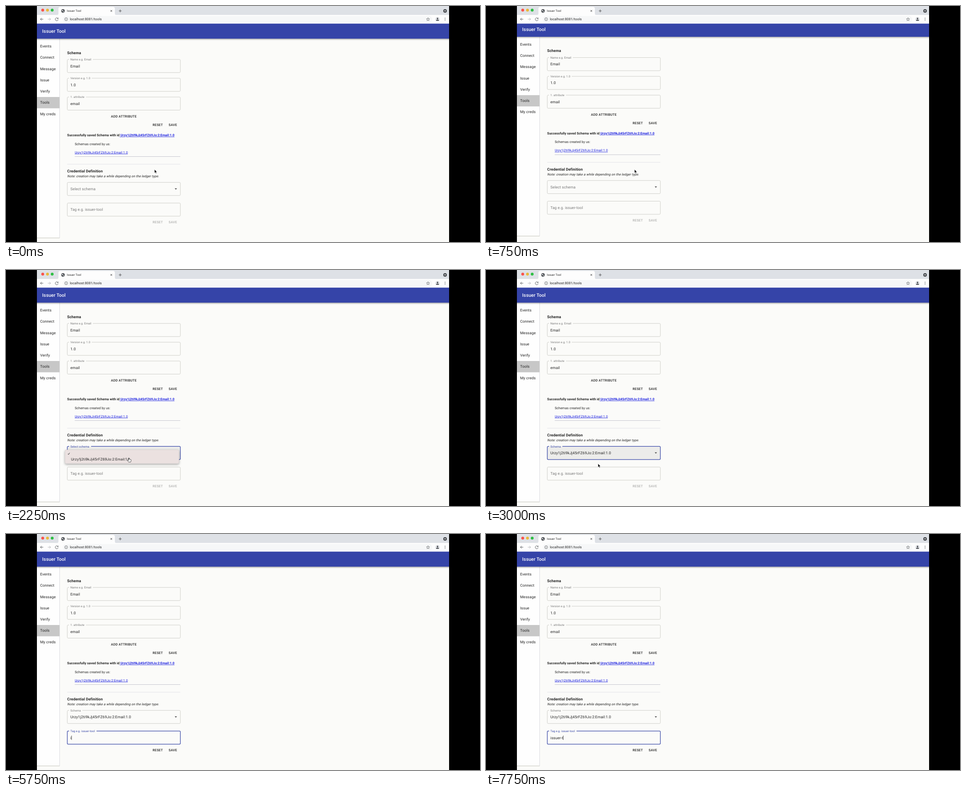
Recreate the animation shown at these times as an HTML page. Size 1058 px wide and 529 px high, loop 8 s.

```html
<!DOCTYPE html>
<html lang="en">
<head>
<meta charset="utf-8">
<title>Issuer Tool</title>
<style>
html, body { margin: 0; width: 100%; height: 100%; overflow: hidden; background: #000; }
svg { display: block; width: 100vw; height: 100vh; }
text { font-family: Roboto, Arial, sans-serif; text-rendering: geometricPrecision; white-space: pre; }
.system { font-family: Inter, Arial, sans-serif; }
.link { fill: #1a1fe0; text-decoration: underline; }
.tight { letter-spacing: .03px; }
</style>
</head>
<body>
<svg id="stage" viewBox="0 0 1058 529" preserveAspectRatio="none"></svg>
<script>
const LOOP = 8000, STEP = 250;
const SCHEMA_ID = 'Urzy1j2ti9kJj45rFZ69Jo:2:Email:1.0';
const TAG = 'issuer-tool';
const INK = '#242424', GREY = '#777', LINE = '#c3c3bd', INDIGO = '#3646a6';
const BODY = 8.42, SMALL = 7.36, LABEL = 6.31;
const LEFT = 69, WIDTH = 920, BAR_TOP = 39.4;
const stage = document.getElementById('stage');

// Text is placed by the vertical centre of its capitals.
const baseline = (y, size) => (y + size * 0.355).toFixed(2);
const text = (x, y, str, size = BODY, attrs = '') =>
  `<text x="${x}" y="${baseline(y, size)}" font-size="${size}" fill="${INK}" letter-spacing="${(size * 0.0098).toFixed(3)}" ${attrs}>${str}</text>`;
const rect = (x, y, w, h, fill, attrs = '') =>
  `<rect x="${x}" y="${y}" width="${w}" height="${h}" fill="${fill}" ${attrs}/>`;
const circle = (x, y, r, fill, attrs = '') =>
  `<circle cx="${x}" cy="${y}" r="${r}" fill="${fill}" ${attrs}/>`;
const path = (d, stroke, width = 0.8, attrs = '') =>
  `<path d="${d}" fill="none" stroke="${stroke}" stroke-width="${width}" ${attrs}/>`;

// Field border, open at the top between x = 140.9 and the notch end.
const outline = (y, notch) =>
  `M${notch} ${y}H387.2a2 2 0 0 1 2 2v25.4a2 2 0 0 1 -2 2H138.8a2 2 0 0 1 -2 -2v-25.4a2 2 0 0 1 2 -2H140.9`;
const filledField = (y, label, value, notch) =>
  path(outline(y, notch), LINE) +
  text(143.8, y - 0.2, label, LABEL, `style="fill:${GREY}"`) +
  text(143.8, y + 14.8, value);
const button = (x, y, str) =>
  `<text x="${x}" y="${baseline(y, SMALL)}" font-size="${SMALL}" font-weight="500" letter-spacing=".21" text-anchor="middle" fill="${INK}">${str}</text>`;
// Upright letters slanted in place keep their upright widths.
const slanted = (x, y, str, size) =>
  `<g transform="translate(${x} ${baseline(y, size)}) skewX(-14)">${text(0, -size * 0.355, str, size)}</g>`;

function browserBar() {
  const icon = '#55585c';
  return rect(LEFT, 0, WIDTH, 20.5, '#dee1e6') +
    rect(LEFT, 20, WIDTH, BAR_TOP - 20, '#fdfdfd') +
    rect(126.5, 22.6, 825, 14.2, '#f6f7f8', 'rx="7.1"') +
    circle(82, 9.3, 3.2, '#f9544d') + circle(92.6, 9.3, 3.2, '#e9b93a') + circle(103.1, 9.3, 3.2, '#2fbf45') +
    '<path d="M113 20.5q4 0 4-4V6q0-4 4-4H239q4 0 4 4v10.500q0 4 4 4z" fill="#fdfdfd"/>' +
    circle(127.2, 11, 3.9, '#4a4d51') +
    '<path d="M124.300 9.500l2.700-.8 1 1.200-1.400 1.800-1.700-.4zM127.800 11.800l2-.2-.6 2-1.400.3z" fill="#dadcde"/>' +
    text(136, 11.1, 'Issuer Tool', 6.4) +
    path('M233.100 9.100l3.800 3.800m0-3.800l-3.800 3.800', '#444', 0.9) +
    path('M251.700 11h6.400M254.900 7.800v6.400', '#444', 0.9) +
    circle(980, 11, 4, '#4a4d51') + '<path d="M978 10h4l-2 2.400z" fill="#fff"/>' +
    path('M83.200 29.600H76.800m3-3l-3 3 3 3', icon, 0.95) +
    path('M93.300 29.600h6.400m-3-3l3 3-3 3', '#b4b6b9', 0.95) +
    path('M115.800 27.700a3.300 3.300 0 1 0 .7 2.700M116.400 26.200v2.200h-2.300', icon, 0.95) +
    circle(134.3, 29.6, 3.3, 'none', `stroke="${icon}" stroke-width=".8"`) +
    path('M134.300 29.200v2.200M134.300 27.500v.9', icon, 0.8) +
    text(142.4, 29.6, 'localhost:8081/tools', 7.6) +
    path('M942 26.200l1 2.400 2.500.2-1.900 1.700.6 2.500-2.200-1.300-2.200 1.300.6-2.500-1.900-1.700 2.500-.2z', icon, 0.75) +
    circle(963.2, 29.6, 5.2, '#e4e6ea') + circle(963.2, 28, 1.7, '#44474c') +
    '<path d="M959.800 32.900q0-2.500 3.400-2.500t3.400 2.500z" fill="#44474c"/>' +
    [27, 29.6, 32.2].map(y => circle(980, y, 0.8, icon)).join('');
}

function sideNav() {
  const items = ['Events', 'Connect', 'Message', 'Issue', 'Verify', 'Tools', 'My creds'];
  return rect(LEFT, 73, 50.6, 446.8, '#fefefe') +
    path('M119.700 73V519.800', '#d2d2d8', 0.8) + path('M69 519.900H119.700', '#c2c2b8', 1) +
    rect(LEFT, 204, 50.6, 25.3, '#c7c7c7') +
    items.map((name, i) => text(76.2, 90 + i * 25.27, name)).join('');
}

function form() {
  const bold = 'font-weight="700"';
  return text(136.6, 104.7, 'Schema', BODY, bold) +
    filledField(119.8, 'Name e.g. Email', 'Email', 193.8) +
    filledField(161.9, 'Version e.g. 1.0', '1.0', 191.2) +
    filledField(204, '1. attribute', 'email', 178.5) +
    button(263, 247.2, 'ADD ATTRIBUTE') + button(338.7, 266.2, 'RESET') + button(372.5, 266.2, 'SAVE') +
    text(136.6, 289.4, `Successfully saved Schema with id<tspan class="link"> ${SCHEMA_ID}</tspan>`, SMALL, bold + ' class="tight"') +
    text(153.4, 309, 'Schemas created by us:', SMALL) +
    text(153.4, 327.9, SCHEMA_ID, SMALL, 'class="link"') +
    path('M153.400 337.500H389', '#b9b9c4', 0.8) + path('M136.600 354.600H389', '#dcdce2', 0.8) +
    text(136.6, 369.8, 'Credential Definition', BODY, bold) +
    slanted(136.6, 381.6, 'Note: creation may take a while depending on the ledger type.', SMALL) +
    rect(136.8, 395.4, 252.4, 29.4, '#000', 'rx="2" fill-opacity=".06" id="selectShade"') +
    path('', LINE, 0.8, 'id="selectBox"') + text(143.8, 410, '', BODY, 'id="selectLabel"') +
    text(143.8, 410.2, SCHEMA_ID, BODY, 'id="selectValue"') +
    '<path d="M376.500 408.800h5.200l-2.600 2.700z" fill="#444"/>' +
    path('', LINE, 0.8, 'id="tagBox"') + text(143.8, 456, 'Tag e.g. issuer-tool', BODY, 'id="tagLabel"') +
    text(143.8, 456.7, '', BODY, 'id="tagValue"') +
    rect(0, 451.9, 0.7, 9.6, '#111', 'id="caret"') +
    `<g id="actions">${button(338.7, 484.8, 'RESET')}${button(372.5, 484.8, 'SAVE')}</g>`;
}

function popup() {
  return '<g id="menu">' +
    rect(131.8, 403, 254.2, 30.8, '#ebe1e0', 'rx="3" stroke="#c9c2c2" stroke-width=".5" filter="url(#drop)"') +
    rect(134.8, 405.8, 248.2, 11.4, '#3f8df6', 'rx="2" id="highlight"') +
    path('M138.200 412l1.300 1.700 2.600-3.900', INK, 0.95, 'id="check"') +
    text(144.9, 423.9, SCHEMA_ID, 7.95, 'class="system" style="letter-spacing:0" id="option"') + '</g>';
}

function pointers() {
  return '<path id="arrow" d="M0 0v8.200l1.900-1.700 1.300 2.900 1.400-.6-1.300-2.800h2.500z" fill="#111" stroke="#fff" stroke-width=".6"/>' +
    '<path id="hand" d="M-2.200-4.200q.9-1 1.700 0v2.500q.9-.5 1.500.2.900-.4 1.500.3 1.200-.3 1.300.8v2.200l-1 2.800h-4.500l-2.400-3.300q-.4-1.300.7-1.100l1.200 1z" fill="#fff" stroke="#222" stroke-width=".75"/>' +
    path('M-1.700-3.600Q0-3.600 0-2.800Q0-3.600 1.700-3.600M0-2.800V2.800M-1.700 3.600Q0 3.600 0 2.800Q0 3.600 1.700 3.600', '#333', 0.75, 'id="beam"');
}

// The app bar reaches above the clip edge so that its top stays put on scroll.
stage.innerHTML =
  `<defs>
    <clipPath id="view">${rect(LEFT, BAR_TOP, WIDTH, 490, '#fff')}</clipPath>
    <linearGradient id="shade" x2="0" y2="1"><stop stop-color="#000" stop-opacity=".32"/><stop offset="1" stop-color="#000" stop-opacity="0"/></linearGradient>
    <filter id="drop" x="-10%" y="-30%" width="120%" height="180%"><feDropShadow dx="0" dy="2" stdDeviation="2.600" flood-opacity=".36"/></filter>
  </defs>` +
  rect(0, 0, 1058, 529, '#000') + rect(LEFT, 39, WIDTH, 490, '#fbfbf9') +
  browserBar() +
  '<g clip-path="url(#view)"><g id="page">' + sideNav() + form() +
  rect(LEFT, 73, WIDTH, 4.2, 'url(#shade)') + rect(LEFT, 30, WIDTH, 43.2, '#3544a8') +
  text(80.8, 56.6, 'Issuer Tool', 10.5, 'font-weight="500" style="fill:#fff"') +
  '</g></g>' + popup() + pointers();

const el = id => document.getElementById(id);
const show = (id, on) => el(id).setAttribute('visibility', on ? 'visible' : 'hidden');
const set = (id, attrs) => { for (const k in attrs) el(id).setAttribute(k, attrs[k]); };
const mix = (a, b, p) => a + (b - a) * p;

// p runs from a resting placeholder (0) to a raised label (1).
function drawField(name, y, p, notch, label, active) {
  const size = mix(BODY, LABEL, p), raised = p === 1;
  set(name + 'Box', {
    d: outline(y, raised ? notch : 140.9),
    stroke: !active ? LINE : raised ? INDIGO : '#292b48',
    'stroke-width': active ? 1.25 : 0.8
  });
  set(name + 'Label', {
    y: baseline(mix(y + 14.6, y - 0.1, p), size),
    'font-size': size,
    'letter-spacing': size * 0.0098,
    fill: active && raised ? INDIGO : GREY
  });
  el(name + 'Label').textContent = label;
}

// Pointer stops: time, shape, x, y.
const STOPS = [
  [0, 'arrow', 331.4, 366.2], [1000, 'hand', 279.6, 415.2], [1750, 'hand', 278, 419],
  [2000, 'hand', 275.4, 426], [3000, 'arrow', 250, 434], [3250, 'beam', 224, 459.2],
  [5750, 'none', 0, 0]
];
const KEYS = [5750, 6000, 6250, 6500, 7000, 7250, 7500, 7750];

function draw(time) {
  const t = Math.floor(time / STEP) * STEP;
  const scrolled = t >= 250 && t < 1000;
  set('page', { transform: `translate(0 ${scrolled ? -4.2 : 0})` });

  const chosen = t >= 2500, selecting = t >= 1250 && t < 3500;
  const raised = t < 1250 ? 0 : t < 1500 ? 0.58 : 1;
  drawField('select', 395.4, raised, chosen ? 170.5 : 190, chosen ? 'Schema' : 'Select schema', selecting);
  show('selectShade', selecting);
  show('selectValue', chosen);

  const row = t < 2000 ? 0 : t < 2250 ? 1 : -1;
  show('menu', t >= 1250 && !chosen);
  set('highlight', { y: row === 1 ? 417.8 : 405.8, opacity: row < 0 ? 0 : 1 });
  set('check', { stroke: row === 0 ? '#fff' : INK });
  set('option', { fill: row === 1 ? '#fff' : INK });

  const focus = t >= 3500;
  const typed = KEYS.filter(k => k <= t).length;
  drawField('tag', 441.7, focus ? 1 : 0, 202, 'Tag e.g. issuer-tool', focus);
  el('tagValue').textContent = TAG.slice(0, typed);
  set('caret', { x: 143.8 + (typed ? el('tagValue').getComputedTextLength() : 0) });
  show('caret', typed || (focus && (t - 3500) % 1000 < 500));
  set('actions', { opacity: typed ? 1 : 0.34 });

  const [, shape, x, y] = STOPS.filter(s => s[0] <= t).pop();
  for (const id of ['arrow', 'hand', 'beam']) {
    show(id, id === shape);
    set(id, { transform: `translate(${x} ${y})` });
  }
}

const start = performance.now();
function tick() {
  draw((performance.now() - start) % LOOP);
  requestAnimationFrame(tick);
}
tick();
</script>
</body>
</html>
```
